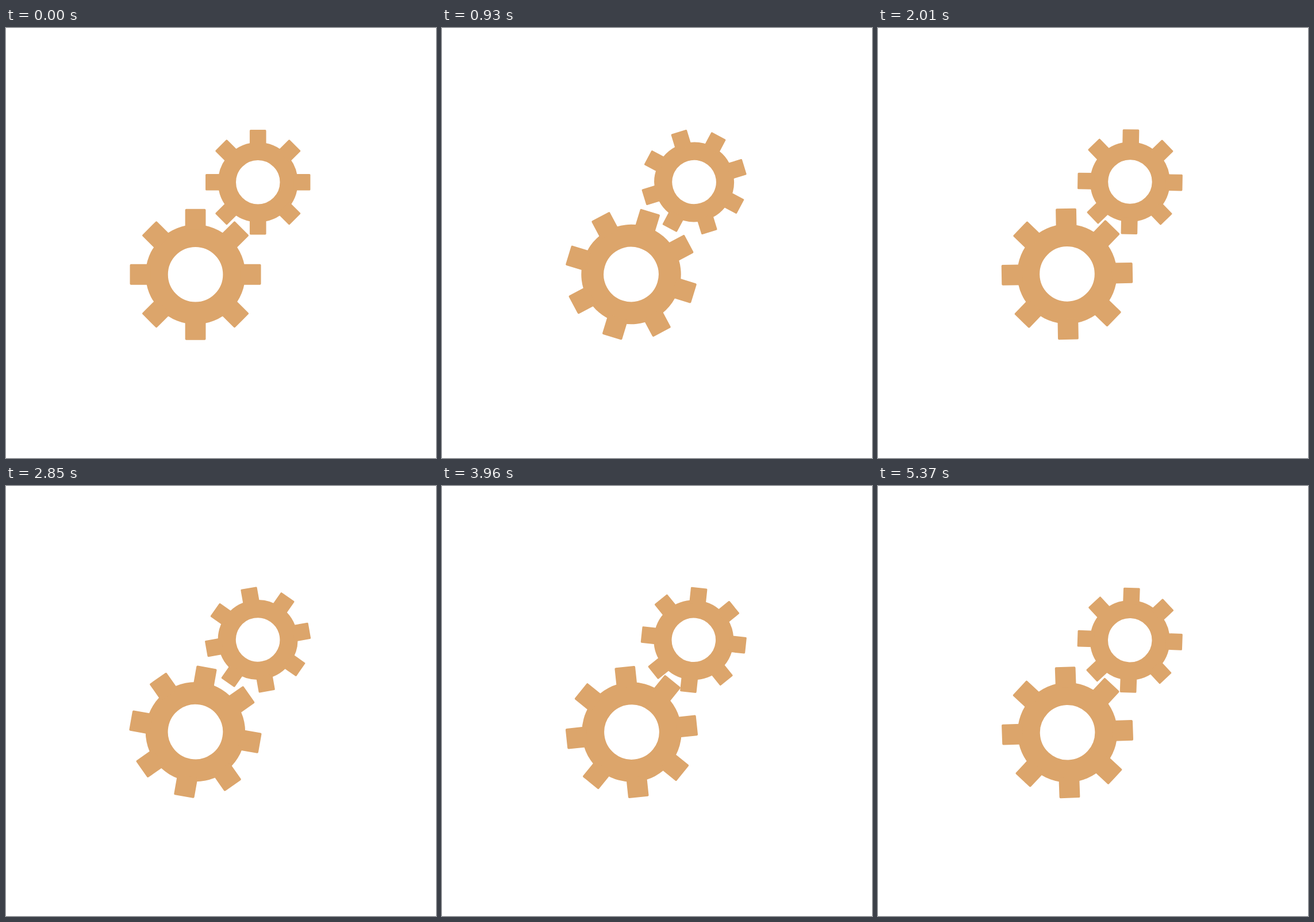
An HTML page for the animation above (5.4 s loop, 748x748 px).

```html
<!DOCTYPE html>
<html lang="en">
<head>
<meta charset="utf-8">
<title>Turning gears</title>
<style>
  html, body { margin: 0; height: 100%; overflow: hidden; background: #fff; }
  svg { display: block; width: 100%; height: 100%; }
</style>
</head>
<body>
<svg viewBox="0 0 748 748">
  <defs>
    <g id="gear" fill="#dca56b">
      <circle r="67.25" fill="none" stroke="#dca56b" stroke-width="38.9"/>
      <g id="teeth"></g>
    </g>
  </defs>
  <g id="big"><use href="#gear" x="0.1" y="0.55"/></g>
  <g id="small"><use href="#gear" x="0.06" y="0.5"/></g>
</svg>
<script>
  const LOOP = 5400, STEP = 30;
  const get = id => document.getElementById(id);

  get('teeth').innerHTML = Array.from({ length: 8 }, (_, i) =>
    `<rect x="-17.9" y="-114" width="35.8" height="36" rx="2" transform="rotate(${i * 45})"/>`
  ).join('');

  // The gears sit slightly off their axles, so they wobble as they turn.
  function turn(id, x, y, scale, angle) {
    get(id).setAttribute('transform', `translate(${x} ${y}) scale(${scale}) rotate(${angle})`);
  }

  function draw() {
    const t = performance.now() % LOOP;
    const angle = Math.floor(t / STEP) * STEP / LOOP * 360;
    turn('big', 329.45, 428.2, 1, angle);
    turn('small', 438.2, 267.85, 0.8, -angle);
    requestAnimationFrame(draw);
  }
  draw();
</script>
</body>
</html>
```
